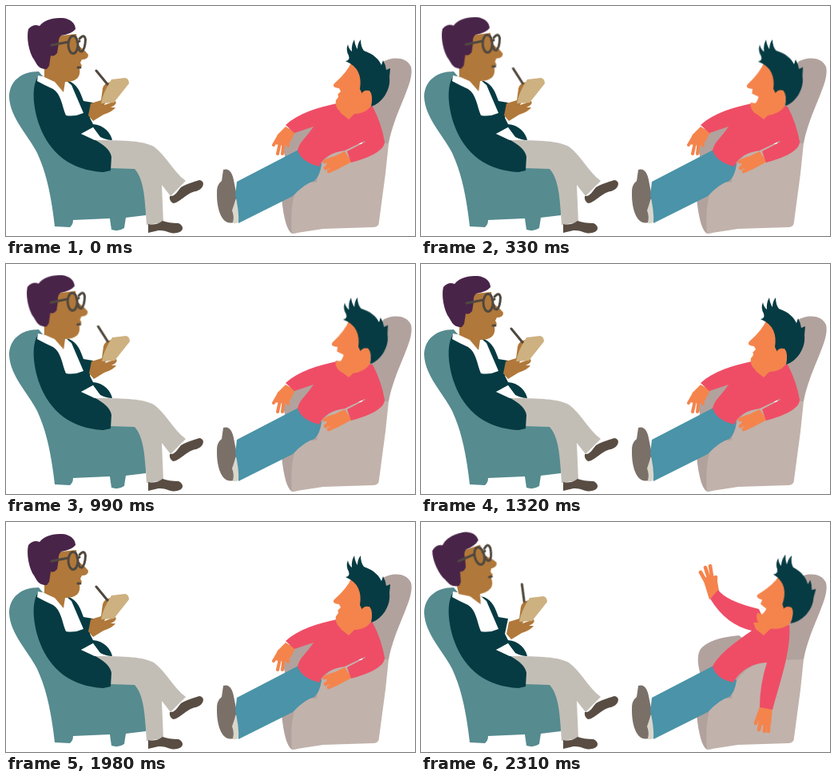
Animation, 512 px wide and 288 px high, one loop 3310 ms. Source, as an HTML page:

```html
<!DOCTYPE html>
<html lang="en">
<head>
<meta charset="utf-8">
<title>Counselling session</title>
<style>
html, body { margin: 0; width: 100%; height: 100%; overflow: hidden; background: #fff; }
svg { display: block; width: 100vw; height: 100vh; }
.teal { fill: #568b8f; } .dark { fill: #063b43; } .brown { fill: #b0783a; }
.hair { fill: #492449; } .slacks { fill: #c2beb6; } .shoe { fill: #594d43; }
.paper { fill: #cdb180; } .white { fill: #fff; } .back { fill: #b2a29d; }
.seat { fill: #c1b2ab; } .pink { fill: #ef4d66; } .skin { fill: #f4844c; }
.jeans { fill: #4a93a8; } .boot { fill: #7a7068; }
.line { fill: none; stroke: #50483f; stroke-width: 3; stroke-linecap: round; }
.fingers { fill: none; stroke: #f4844c; stroke-width: 4.6; stroke-linecap: round; stroke-linejoin: round; }
#listenerHead { transform-origin: 70px 95px; }
#talkerHead { transform-origin: 440px 130px; }
#pen { transform-origin: 128px 100px; }
</style>
</head>
<body>
<svg viewBox="0 0 512 288">
  <!-- listener -->
  <path class="teal" d="M41 82C18 82 4 95 4 114C5 140 28 162 39 184C52 212 57 242 61 276L80 277Q84 274 84 268L130 266L132 280Q141 283 148 278L150 265L175 262C180 235 174 206 158 202L112 168Z"/>
  <path class="slacks" d="M112 168C150 168 172 169 185 176C200 187 210 208 225 219L206 238L195 224L197 271L176 274C174 248 174 218 161 204L130 203Z"/>
  <path class="shoe" d="M205 238C211 239 214 233 219 227Q225 223 242 218C250 219 248 229 238 232C227 233 217 247 209 247Q204 244 205 238Z"/>
  <path class="shoe" d="M178 273Q188 275 196 269Q204 272 216 272C224 276 222 283 214 284C206 286 200 280 191 281L178 284Z"/>
  <path class="dark" d="M41 87C31 100 34 128 42 150C55 185 82 206 122 208L131 206L132 189C131 180 121 173 112 168L94 160L109 152L118 164Q126 168 133 168C131 159 123 149 109 148L105 140L109 121L97 119C93 108 90 99 79 94Z"/>
  <path class="white" d="M94 160L109 152L119 166L111 168Z"/>
  <path class="white" d="M40 87L75 93L82 99L97 134Q86 139 75 137C70 125 69 110 59 104Q48 99 39 94Z"/>
  <g id="listenerHead">
    <path class="brown" d="M48 72L60 38L88 35L90 50Q97 53 103 61Q103 67 95 67L93 71L95 75L92 78C94 89 88 95 74 95L72 108L61 95L48 89Z"/>
    <path class="hair" d="M51 79C39 79 39 72 33 64C27 51 26 37 28 29Q34 22 42 25C49 16 60 15 71 15C81 16 87 22 87 29Q82 35 69 37Q65 41 66 47L64 59Q60 64 56 62L54 75Z"/>
    <path class="line" d="M57 49L78 45M89 45L92 44M90 77L93 77"/>
    <ellipse class="line" cx="84" cy="48.5" rx="6" ry="11"/>
    <path class="line" d="M92 41Q98 34 99.500 42Q99 54 95 57Q91 57 91 51"/>
  </g>
  <g id="pad">
    <path class="brown" d="M106 122L119 118L121 103Q123 96 131 95L135 99L123 124L137 119Q140 123 131 127L137 127Q134 132 122 136L109 144L103 137Z"/>
    <path class="paper" d="M119 122Q121 109 132 92L149 90Q154 91 154 97L135 121Z"/>
  </g>
  <path id="pen" class="line" d="M113 81L127 98"/>

  <!-- armchair -->
  <path class="back" d="M472 70C481 64 501 62 507 76C512 96 488 128 479 172L445 178L455 120Z"/>
  <path class="back" d="M345 241L349 188Q344 168 350 159Q362 145 398 142L452 180L393 228L365 284L358 285Q349 280 345 241Z"/>
  <path class="seat" d="M358 285C356 263 358 237 366 225Q377 220 389 221C391 193 410 177 440 173L479 172L475 210L467 270Q467 277 460 277L397 279Z"/>

  <!-- talker -->
  <path d="M283 252L290 240L292 270Q287 274 282 271Z" fill="#d9d6cc"/>
  <path class="boot" d="M272 205C280 202 284 211 285 218L289 238L283 256Q286 264 284 271C271 275 264 256 264 236Q263 224 270 219Z"/>
  <path class="jeans" d="M289 220L366 180L395 198Q393 213 386 219Q374 222 359 238L291 272Q292 256 287 237Z"/>
  <g data-show="AB">
    <path class="skin" d="M350 151L362 158L356 170L349 175L336 173L340 161Z"/>
    <path class="fingers" style="stroke-width:4" d="M342 162L335 174M344 167L340 185M348 168L346 185M352 166L353 175"/>
    <path class="skin" d="M424 182L433 195L414 205L400 203L403 192Z"/>
    <path class="fingers" d="M409 191L399 195M409 197L400 203M415 202L404 207"/>
    <path class="pink" d="M414 122C391 127 366 134 350 149L361 159L385 151C376 165 367 170 365 181C370 194 382 198 392 201C397 189 409 183 424 181L449 169L450 170L427 182L432 196C451 191 474 182 474 170Q470 147 459 126Z"/>
  </g>
  <g data-show="C">
    <path class="skin" d="M361 97L373 86L370 69L363 66L353 71Z"/>
    <path class="fingers" d="M359 79L350 63M362 76L356 57M365 74L362 55M368 79L369 69"/>
    <path class="skin" d="M424 231L440 233L438 254L426 254L420 244Z"/>
    <path class="fingers" d="M424 238L419 252M426 246L423 260M431 247L430 262M435 246L435 262"/>
    <path class="pink" d="M362 96L372 85Q382 99 423 109L432 129L461 129C464 159 449 202 440 235L424 232Q424 204 433 176C412 177 398 188 391 201C378 198 369 193 365 181C373 165 394 150 414 136Q382 129 362 96Z"/>
  </g>
  <path class="skin" d="M416 126L456 124L439 132L429 142L419 134Z"/>
  <g id="talkerHead">
    <path class="skin" data-show="A" d="M433 69Q428 82 411 97Q407 102 417 103L419 107L415 111Q418 113 413 118C411 129 420 136 430 135Q450 136 457 125L462 85Z"/>
    <path class="skin" data-show="BC" d="M433 69Q428 82 411 97Q407 102 417 103L416 109L424 114L420 121L414 120C412 131 422 138 432 137Q450 136 457 125L462 85Z"/>
    <path class="white" data-show="BC" d="M416 109L424 113L421 120L418 115L414 114Z"/>
    <path class="dark" d="M425 69Q431 68 429 62Q425 55 428 48Q429 54 433 57Q432 49 436 42Q437 50 440 54Q440 47 444 42Q444 51 448 56C460 60 467 67 470 74L472 68Q475 73 476 80L481 78L480 89C482 106 470 122 457 126Q460 112 455 106Q448 105 448 114L443 104Q445 92 441 83Q437 74 425 69Z"/>
    <path class="skin" d="M445 112C445 105 456 103 457 111Q458 121 452 126L445 122Z"/>
  </g>
</svg>
<script>
const LOOP = 3310;
// start time and pose: A rest, B talk, C outburst
const BEATS = [[0, 'A'], [330, 'B'], [660, 'A'], [990, 'B'], [1320, 'A'], [1650, 'B'], [1980, 'A'], [2310, 'C'], [LOOP, 'C']];

function pose(el, property, valueOf) {
  const frames = BEATS.map(([time, name]) => ({
    offset: time / LOOP, easing: 'steps(1, end)', [property]: valueOf(name)
  }));
  const motion = el.animate(frames, { duration: LOOP, iterations: Infinity });
  motion.startTime = 0;
}

const moves = {
  listenerHead: { A: 'none', B: 'translate(0px, -1px) rotate(-1deg)', C: 'translate(0px, -4px) rotate(-13deg)' },
  talkerHead: { A: 'none', B: 'translate(-1px, 0px) rotate(-2deg)', C: 'translate(5px, -2px) rotate(10deg)' },
  pad: { A: 'none', B: 'translate(1px, 0px)', C: 'translate(4px, 3px)' },
  pen: { A: 'none', B: 'translate(0px, -1px) rotate(7deg)', C: 'translate(1px, 2px) rotate(32deg)' }
};

for (const [id, states] of Object.entries(moves))
  pose(document.getElementById(id), 'transform', name => states[name]);
for (const el of document.querySelectorAll('[data-show]'))
  pose(el, 'opacity', name => el.dataset.show.includes(name) ? 1 : 0);
</script>
</body>
</html>
```
